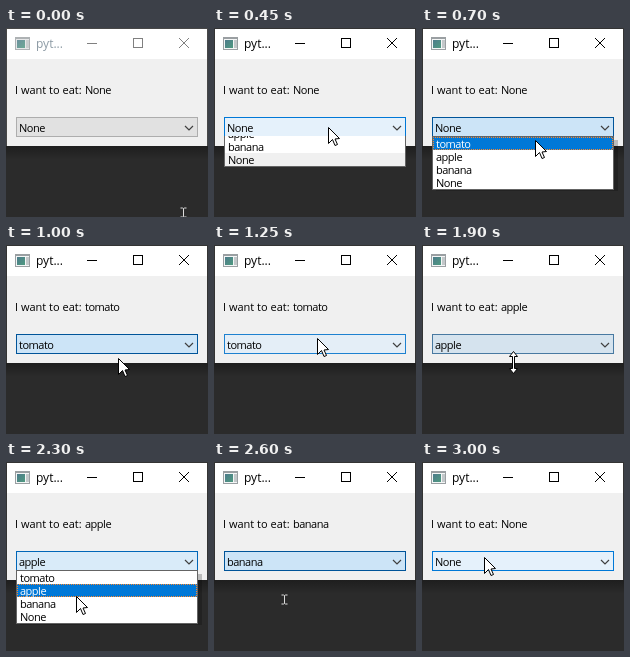
Recreate the animation shown at these times as an HTML page with a canvas. Size 202 by 189 pixels, loop 3050 ms.

```html
<!DOCTYPE html>
<html lang="en">
<head>
<meta charset="utf-8">
<title>Combo box</title>
<style>
  html, body { margin: 0; width: 100%; height: 100%; overflow: hidden; background: #2b2b2b; }
  canvas { display: block; }
</style>
</head>
<body>
<canvas id="stage" width="202" height="189"></canvas>
<script>
const ctx = document.getElementById('stage').getContext('2d');
const LOOP = 3050, STEP = 50, FADE = 120;
const ITEMS = ['tomato', 'apple', 'banana', 'None'];
const NONE = 3;
const UI = '500 11px "Open Sans", "Noto Sans", sans-serif';
const TITLE = '12px "Open Sans", "Noto Sans", sans-serif';
const BOX = { x: 10, y: 89, w: 182, h: 20 };
const ROW = 13, LIST_Y = 108, LIST_H = 54;

// Combo looks: fill and border as RGB.
const LOOK = {
  idle: [225, 225, 225, 173, 173, 173],
  hover: [229, 241, 251, 0, 120, 215],
  pressed: [204, 228, 247, 0, 84, 153]
};

// Each visit: click at rest, slide to a row, drift down slowly, pick it.
const VISITS = [
  { open: 400, pick: 950, item: 0, rest: [114, 99], row: [113, 111] },
  { open: 1300, pick: 1800, item: 1, rest: [103, 93], row: [100, 122] },
  { open: 2150, pick: 2600, item: 2, rest: [74, 101], row: [70, 134] }
];
const START = [177, 184], END = [62, 95];
const RETURN = 2750, WHEEL = 2950;

const stops = [
  [0, START],
  ...VISITS.flatMap(({ open, pick, rest, row }) => [
    [open - 100, rest],
    [open + 50, rest],
    [open + 150, row],
    [pick, [row[0], row[1] + (pick - open - 150) / 100]]
  ]),
  [RETURN, END],
  [LOOP, END]
];
const fades = [
  ...VISITS.flatMap(({ open, pick }) => [
    [open - 150, LOOK.hover],
    [open + 90, LOOK.pressed],
    [pick + 50, LOOK.idle]
  ]),
  [RETURN - 70, LOOK.hover]
];

const clamp = v => Math.max(0, Math.min(1, v));
const mix = (a, b, p) => a.map((v, i) => v + (b[i] - v) * p);
const smooth = p => p * p * (3 - 2 * p);
const rgb = c => `rgb(${c.map(Math.round).join()})`;

function rect(x, y, w, h, color) {
  ctx.fillStyle = color;
  ctx.fillRect(x, y, w, h);
}

function frame(x, y, w, h, color) {
  ctx.strokeStyle = color;
  ctx.lineWidth = 1;
  ctx.strokeRect(x + .5, y + .5, w - 1, h - 1);
}

function line(points, color, width = 1) {
  ctx.beginPath();
  points.forEach(([x, y]) => ctx.lineTo(x, y));
  ctx.strokeStyle = color;
  ctx.lineWidth = width;
  ctx.stroke();
}

function text(s, x, y, color = '#000', font = UI, spacing = -.5) {
  ctx.font = font;
  ctx.letterSpacing = spacing + 'px';
  ctx.fillStyle = color;
  ctx.fillText(s, x, y);
}

function pointerAt(t) {
  const i = stops.findIndex(s => s[0] > t);
  const [[t0, a], [t1, b]] = [stops[i - 1], stops[i]];
  return mix(a, b, smooth((t - t0) / (t1 - t0))).map(Math.round);
}

function lookAt(t) {
  return fades.reduce((c, [start, look]) => mix(c, look, clamp((t - start) / FADE)), LOOK.idle);
}

function pickedAt(t) {
  if (t >= WHEEL) return NONE;
  return VISITS.reduce((item, v) => t >= v.pick ? v.item : item, NONE);
}

function drawWindow(active) {
  rect(0, 0, 202, 189, '#2b2b2b');
  const shade = ctx.createLinearGradient(0, 118, 0, 132);
  shade.addColorStop(0, 'rgba(0,0,0,.3)');
  shade.addColorStop(1, 'rgba(0,0,0,0)');
  rect(0, 118, 202, 14, shade);
  rect(0, 0, 202, 118, active ? '#343434' : '#484848');
  rect(1, 1, 200, 30, '#fff');
  rect(1, 31, 200, 87, '#f0f0f0');

  ctx.globalAlpha = active ? 1 : .8;
  rect(9, 9, 15, 13, '#9a9fa2');
  rect(10, 11, 13, 10, '#f4f6f6');
  const pane = ctx.createLinearGradient(11, 12, 19, 20);
  pane.addColorStop(0, '#4d7b8b');
  pane.addColorStop(1, '#4f9a80');
  rect(11, 12, 8, 8, pane);
  rect(20, 12, 3, 8, '#c3c8ca');
  ctx.globalAlpha = 1;

  text('pyt...', 30, 20, active ? '#000' : '#8c9aa4', TITLE, 0);
  const mark = active ? '#000' : '#808080';
  rect(81, 15, 10, 1, mark);
  frame(127, 10, 10, 10, mark);
  line([[173, 10], [183, 20]], mark);
  line([[183, 10], [173, 20]], mark);
}

function drawCombo(t, value) {
  const c = lookAt(t);
  rect(BOX.x, BOX.y, BOX.w, BOX.h, rgb(c.slice(0, 3)));
  frame(BOX.x, BOX.y, BOX.w, BOX.h, rgb(c.slice(3)));
  text(value, 13, 104);
  line([[179, 98], [183, 102], [187, 98]], '#404040', 1.2);
}

function drawList(t, list, y, picked) {
  const shown = Math.round(LIST_H * clamp((t - list.open + 8) / 100));
  const over = Math.floor((y - LIST_Y - 1) / ROW);
  const hot = over >= 0 && over < ITEMS.length ? over : picked;

  if (shown === LIST_H) rect(BOX.x + 4, LIST_Y + 4, BOX.w, LIST_H - 3, 'rgba(0,0,0,.22)');
  ctx.save();
  ctx.beginPath();
  ctx.rect(BOX.x, LIST_Y, BOX.w, shown);
  ctx.clip();
  ctx.translate(0, shown - LIST_H);
  rect(BOX.x, LIST_Y, BOX.w, LIST_H, '#fff');
  ITEMS.forEach((item, i) => {
    const top = LIST_Y + 1 + i * ROW;
    const lit = i === hot && over >= 0;
    if (i === hot) rect(11, top, 180, ROW, lit ? '#0078d7' : '#f0f0f0');
    if (lit) {
      ctx.setLineDash([1, 1]);
      ctx.lineDashOffset = .5;
      frame(11, top, 180, ROW, '#ff8728');
      ctx.setLineDash([]);
    }
    text(item, 14, top + 11, lit ? '#fff' : '#000');
  });
  frame(BOX.x, LIST_Y, BOX.w, LIST_H, '#646464');
  ctx.restore();
}

function shape(points) {
  ctx.beginPath();
  points.forEach(([x, y]) => ctx.lineTo(x, y));
  ctx.closePath();
  ctx.fillStyle = '#fff';
  ctx.fill();
  ctx.strokeStyle = '#000';
  ctx.lineWidth = 1;
  ctx.stroke();
}

function drawPointer([x, y], listOpen) {
  ctx.save();
  ctx.translate(x + .5, y + .5);
  if (!listOpen && y > 121) {
    for (const s of [-1, 1]) line([[-3, 4.5 * s], [-1, 4.5 * s], [0, 4 * s], [1, 4.5 * s], [3, 4.5 * s]], '#ddd');
    line([[0, -4], [0, 4]], '#ddd');
  } else if (!listOpen && y > 115) {
    shape([[0, -11], [4, -6], [1, -6], [1, 6], [4, 6], [0, 11],
           [-4, 6], [-1, 6], [-1, -6], [-4, -6]]);
  } else {
    shape([[0, 0], [0, 16], [4, 12], [6.5, 18], [9, 17], [6.5, 11.5], [11, 11]]);
  }
  ctx.restore();
}

function draw(t) {
  const pointer = pointerAt(t);
  const picked = pickedAt(t);
  const list = VISITS.find(v => t >= v.open && t < v.pick);
  drawWindow(t >= VISITS[0].open);
  text('I want to eat:', 9, 66, '#000', UI, 0);
  text(ITEMS[picked], 79, 66);
  drawCombo(t, ITEMS[picked]);
  if (list) drawList(t, list, pointer[1], picked);
  drawPointer(pointer, list);
}

function tick() {
  const t = performance.now() % LOOP;
  draw(Math.floor(t / STEP) * STEP);
  requestAnimationFrame(tick);
}
tick();
</script>
</body>
</html>
```
